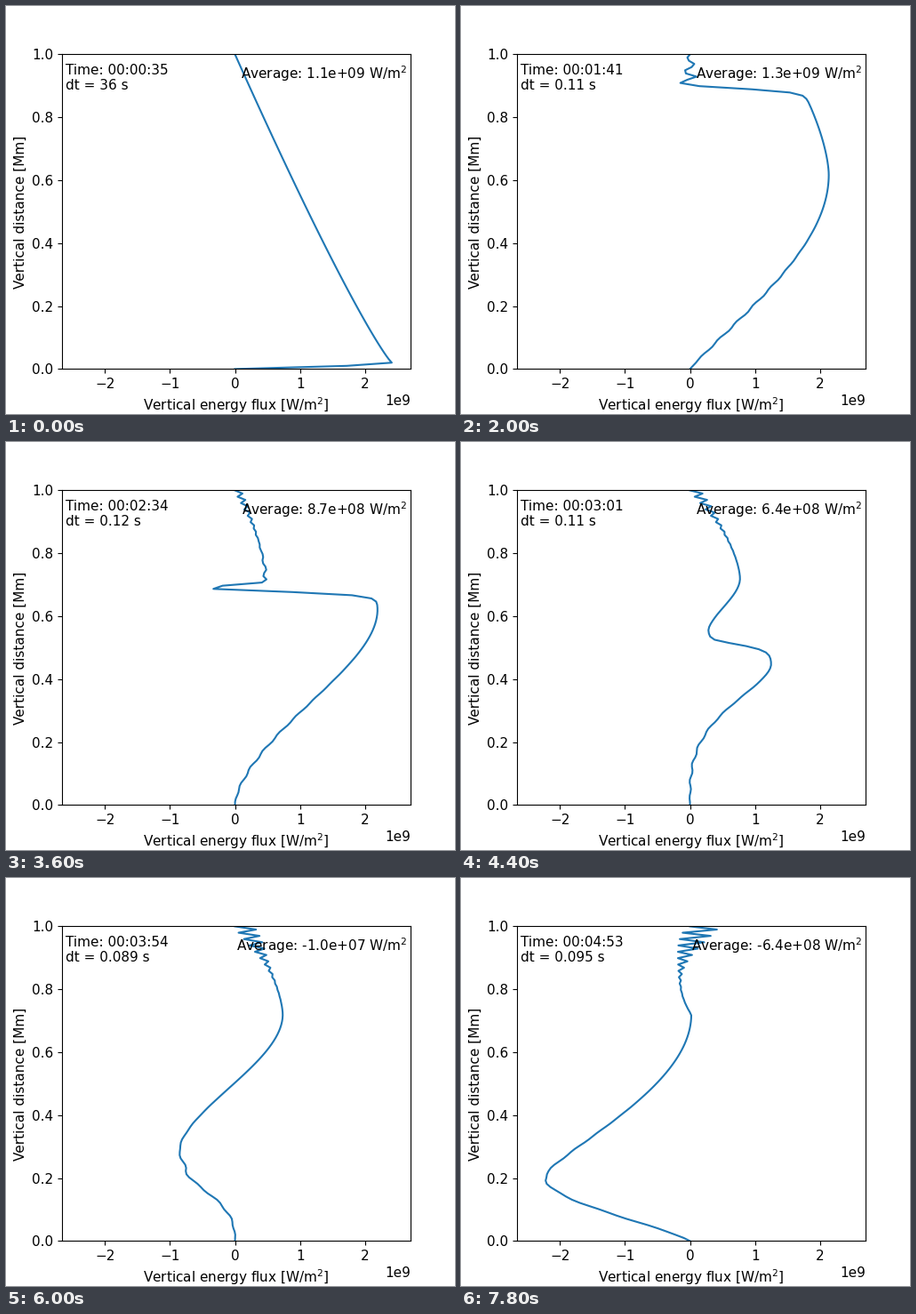
Animation of 505 by 459 pixels, one loop 8 s. Source, as a matplotlib script:

```python
import numpy as np
import matplotlib.pyplot as plt
from matplotlib.animation import FuncAnimation

WIDTH, HEIGHT, DPI = 505, 459, 100
FRAMES, INTERVAL = 40, 200
CREST = .72  # height where the upper flow peaks
plt.rcParams.update({"font.family": "DejaVu Sans", "font.size": 11})

height = np.linspace(0, 1, 100)
parity = np.where(np.arange(100) % 2 == 0, 1, -1)


def at(frame, values):
    return np.interp(frame, [0, 6, 13, 18, 26, 34, 39], values)


def bump(x, center, width, power=2):
    return np.exp(-np.abs((x - center) / width) ** power)


def lower_flow(k):
    """Sine-like rise to a peak, then a slow decline that flattens with time."""
    peak = at(k, [2.41, 2.215, 2.07, 2.19, .31, -1.81, -2.215])
    top = at(k, [.02, .549, .67, .622, .28, .172, .2])
    bend = at(k, [1, 1.05, 1.08, 1.6, 4.5, .55, 1.2])
    rise = np.sin(np.pi / 2 * np.minimum(height / top, 1) ** bend)
    past = np.maximum(height - top, 0) / (1 - top)
    return peak * (rise - np.exp(-k / 9) * past ** min(.88 + .12 * k, 1.6))


def upper_flow(k, start):
    """Eased climb from the front to the crest, then a fall towards the top."""
    base = at(k, [0, 0, 0, .42, .09, -1.81, -2.215])
    crest = at(k, [0, 0, 0, .47, 1.067, .4, .02])
    end = .008 * max(k - 13, 0)
    bend = 1 - .029 * max(k - 28, 0)
    sag = .1 * max(k - 30, 0)
    t = np.clip((height - start) / max(CREST - start, .01), 0, 1) ** bend
    s = np.clip((height - CREST) / (1 - CREST), 0, 1)
    climb = base + (crest - base) * t * t * (3 - 2 * t)
    return climb + (end - crest) * s ** 1.6 - sag * s * (1 - s)


def profile(k):
    front = at(k, [1.03, .978, .825, .675, .345, .165, .195])
    width = .006 + .012 * bump(k, 26, 4)
    below = 1 / (1 + np.exp((height - front) / width))
    x = below * lower_flow(k) + (1 - below) * upper_flow(k, front + 2.5 * width)

    # undershoot and ringing behind the steep front
    x -= 1.1 * bump(k, 15.5, 5, 4) * bump(height, front + .0145, .0113)
    d = height - front - .034
    ring = .24 * bump(k, 13, 4) * np.cos(2 * np.pi * d / .043)
    x += np.where(d > -.005, ring * bump(d, 0, .06, 1), 0)

    # small waves rising from the bottom
    crest = .111 + .003 * (k - 6)
    envelope = (1 - np.exp(-height / .04)) * bump(height, 0, .33, 4)
    x += (.017 * (1 - np.exp(-k)) * envelope
          * np.cos(2 * np.pi * (height - crest) / .055))

    # grid-scale zigzag growing below the top boundary
    zigzag = .25 * (max(k - 8, 0) / 31) ** 1.4
    x += zigzag * parity * bump(height, 1, .1)
    x[[0, -1]] = 0
    return x


def clock_label(k):
    minutes, seconds = divmod(int(35.4 + 6.62 * k), 60)
    dt = np.interp(k, [0, 1, 6, 12, 18, 24, 26, 34, 39],
                   [36, .088, .086, .12, .12, .103, .091, .087, .095])
    return f"Time: 00:{minutes:02d}:{seconds:02d}\ndt = {dt:.2g} s"


def mean_label(k):
    mean = at(k, [1.1, 1.5, 1.2, .87, .42, -.44, -.64]) * 1e9
    return f"Average: {mean:.1e} W/m$^2$"


fig, ax = plt.subplots(figsize=(WIDTH / DPI, HEIGHT / DPI), dpi=DPI)
fig.subplots_adjust(left=63.2 / WIDTH, right=455.2 / WIDTH,
                    bottom=50.6 / HEIGHT, top=404.6 / HEIGHT)
line, = ax.plot([], [], color="#1f77b4", lw=1.5)
ax.set_xlim(-2.655e9, 2.7e9)
ax.set_ylim(0, 1)
ax.set_xlabel("Vertical energy flux [W/m$^2$]")
ax.set_ylabel("Vertical distance [Mm]")
clock = ax.text(.01, .97, "", transform=ax.transAxes, ha="left", va="top")
average = ax.text(.99, .97, "", transform=ax.transAxes, ha="right", va="top")


def draw(k):
    line.set_data(profile(k) * 1e9, height)
    clock.set_text(clock_label(k))
    average.set_text(mean_label(k))
    return line, clock, average


anim = FuncAnimation(fig, draw, frames=FRAMES, interval=INTERVAL,
                     repeat=True, repeat_delay=0, blit=False)
plt.show()
```
